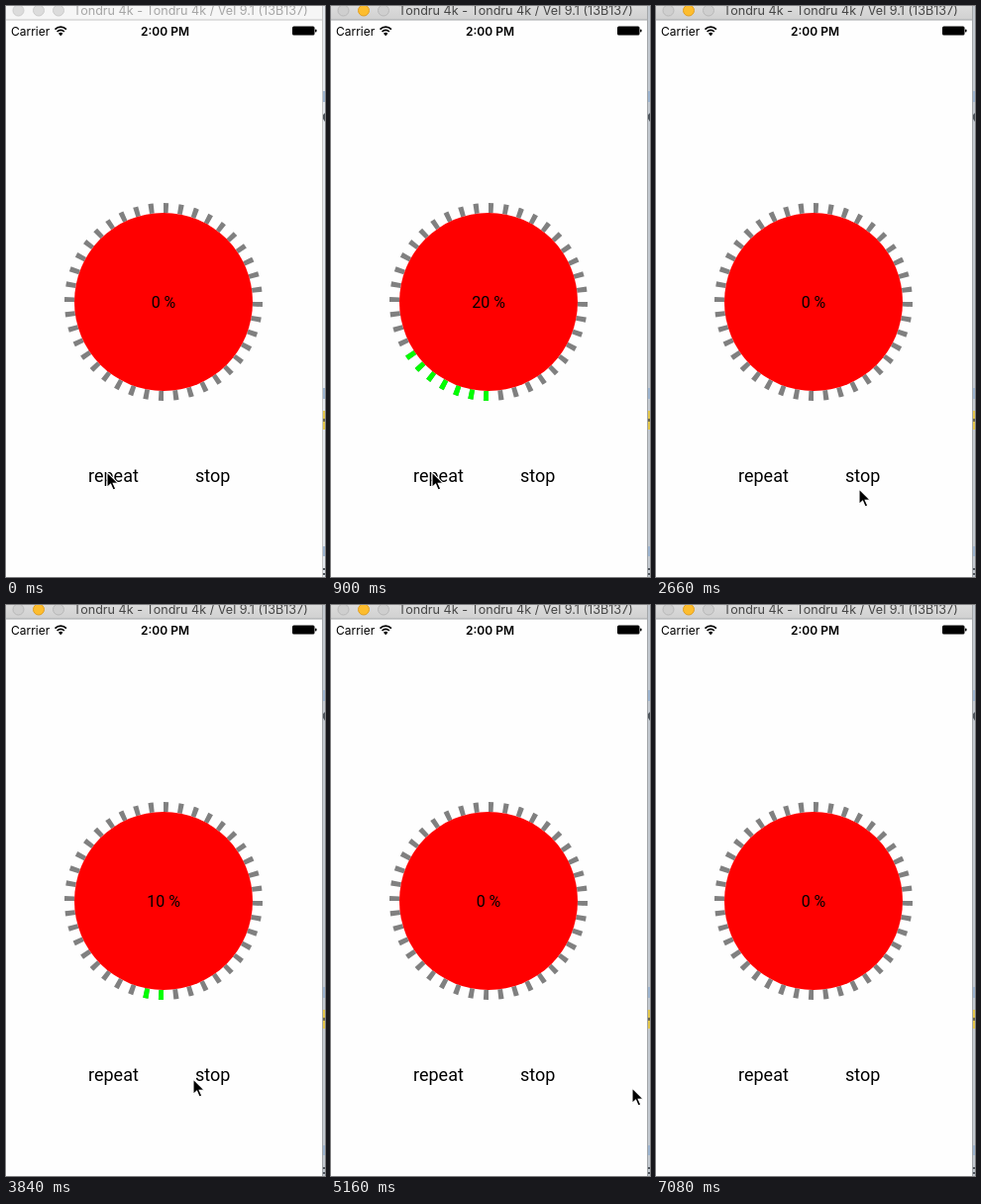
Animation of 322 by 577 pixels, one loop 7510 ms. Source, as an HTML page:

```html
<!DOCTYPE html>
<html lang="en">
<head>
<meta charset="utf-8">
<title>Progress ring</title>
<style>
  html, body { margin: 0; width: 322px; height: 577px; overflow: hidden; background: #fefefe; }
  svg { display: block; }
  .bar { fill: #f6f6f6; }
  .light { fill: #dcdcdc; stroke: #cdcdcd; }
  .title { font: 12.6px Inter, sans-serif; fill: #a6a6a6; }
  .edge { fill: #c6c6c6; }
  .desk { fill: #e3e8ee; }
  .active .bar { fill: url(#chrome); }
  .active .light { fill: #cfcfcf; stroke: #b9b9b9; }
  .active .mid { fill: #fdbd2e; stroke: #e0a028; }
  .active .title { fill: #464646; }
  .active .edge { fill: #a4a7aa; }
  .active .desk { fill: #c3c9d0; }
  .status { font: 12px Inter, sans-serif; }
  .clock { font-weight: 600; text-anchor: middle; }
  .label { font: 16px Roboto, sans-serif; text-anchor: middle; }
  .button { font: 18px Roboto, sans-serif; }
  .ring { fill: none; stroke-width: 10; }
</style>
</head>
<body>
<svg id="stage" width="322" height="577" viewBox="0 0 322 577">
  <defs>
    <linearGradient id="chrome" x2="0" y2="1">
      <stop stop-color="#dcdcdc"/><stop offset="1" stop-color="#d0d0d0"/>
    </linearGradient>
  </defs>

  <!-- desktop behind the window -->
  <rect class="desk" x="319" width="3" height="577"/>
  <g fill="#9db4cf">
    <path d="M320 86h2v11h-2zM320 386h2v11h-2zM320 546h2v10h-2z"/>
    <path fill="#4d545c" d="M320 110l2-2v9l-2-3zM320 568h2v2h-2zM320 573h2v2h-2z"/>
    <path fill="#e2c64c" d="M320 409h2v19h-2z"/>
    <path fill="#6f6a4a" d="M320 417h2v3h-2z"/>
  </g>

  <!-- window -->
  <rect width="319" height="577" fill="#fefefe"/>
  <rect class="edge" x="319" width="1" height="577"/>
  <rect class="bar" width="319" height="14"/>
  <rect class="edge" y="13.5" width="319" height="1"/>
  <circle class="light" cx="12.5" cy="4.5" r="5.5"/>
  <circle class="light mid" cx="33" cy="4.5" r="5.5"/>
  <circle class="light" cx="53" cy="4.5" r="5.5"/>
  <text class="title" x="68" y="9">Tondru 4k - Tondru 4k / Vel 9.1 (13B137)</text>

  <!-- status bar -->
  <text class="status" x="5" y="29.5">Carrier</text>
  <g fill="none" stroke="#000" stroke-width="1.7">
    <path d="M49.5 23.6a8 8 0 0 1 11.4 0M51.6 26a5 5 0 0 1 7.2 0"/>
    <path fill="#000" stroke="none" d="M55.2 30.2l-2.2-2.4a3.2 3.2 0 0 1 4.4 0z"/>
  </g>
  <text class="status clock" x="160.5" y="29.5">2:00 PM</text>
  <rect x="289" y="20.5" width="22.5" height="9" rx="1.5"/>
  <rect x="312" y="23.5" width="1.5" height="3" rx=".7"/>

  <!-- gauge: forty dashes starting at the bottom -->
  <g transform="translate(159 299)">
    <circle class="ring" r="95" pathLength="120" transform="rotate(90)" stroke="#808080" stroke-dasharray="1 2"/>
    <circle class="ring" id="done" r="95" pathLength="120" transform="rotate(90)" stroke="#0f0"/>
    <circle r="90" fill="#f00"/>
    <text class="label" id="label" y="5.5">0 %</text>
  </g>
  <text class="button" x="83" y="481">repeat</text>
  <text class="button" x="191" y="481">stop</text>

  <path id="cursor" d="M0 0v15.5l3.6-3.4 2.6 6 2.6-1.1-2.6-5.8h4.9z" stroke="#fff" stroke-width="1.1"/>
</svg>

<script>
const $ = id => document.getElementById(id);
const LOOP = 7510, STEPS = 51;
const FOCUS = 3, HIDE = 48;
const RATE = 7.75;   // percent per step
const LAG = 5.2;     // the ring trails the label
const runs = [[3.3, 18], [24.7, 33]];

// step, x, y
const path = [
  [0, 102, 471], [7, 102, 471], [10, 116, 487], [13, 169, 499], [16, 198, 492],
  [18, 205, 488], [20, 205, 488], [23, 105, 474], [25, 105, 474], [26, 189, 479],
  [28, 205, 487], [32, 205, 487], [35, 304, 488], [37, 304, 488], [41, 268, 540],
  [44, 229, 556], [47, 232, 570], [51, 232, 570]
];

function cursorAt(k) {
  const i = path.findIndex(p => p[0] > k);
  const [a, x0, y0] = path[i - 1], [b, x1, y1] = path[i];
  const u = (k - a) / (b - a);
  return [x0 + (x1 - x0) * u, y0 + (y1 - y0) * u];
}

function percentAt(k) {
  const run = runs.find(([from, to]) => k >= from && k < to);
  return run ? Math.min(100 + LAG, RATE * (k - run[0])) : 0;
}

function draw(k) {
  const p = percentAt(k);
  const ticks = Math.max(0, Math.min(40, Math.floor(0.4 * (p - LAG) + 0.75)));
  const [x, y] = cursorAt(k);
  $('stage').classList.toggle('active', k >= FOCUS);
  $('label').textContent = Math.min(100, Math.floor(p / 5) * 5) + ' %';
  $('done').setAttribute('stroke-dasharray', '1 2 '.repeat(ticks) + '0 200');
  $('done').setAttribute('visibility', ticks ? 'visible' : 'hidden');
  $('cursor').setAttribute('transform', `translate(${x} ${y})`);
  $('cursor').setAttribute('visibility', k < HIDE ? 'visible' : 'hidden');
}

const start = performance.now();
function tick() {
  const t = (performance.now() - start) % LOOP;
  draw(Math.floor(t / LOOP * STEPS));
  requestAnimationFrame(tick);
}
tick();
</script>
</body>
</html>
```
